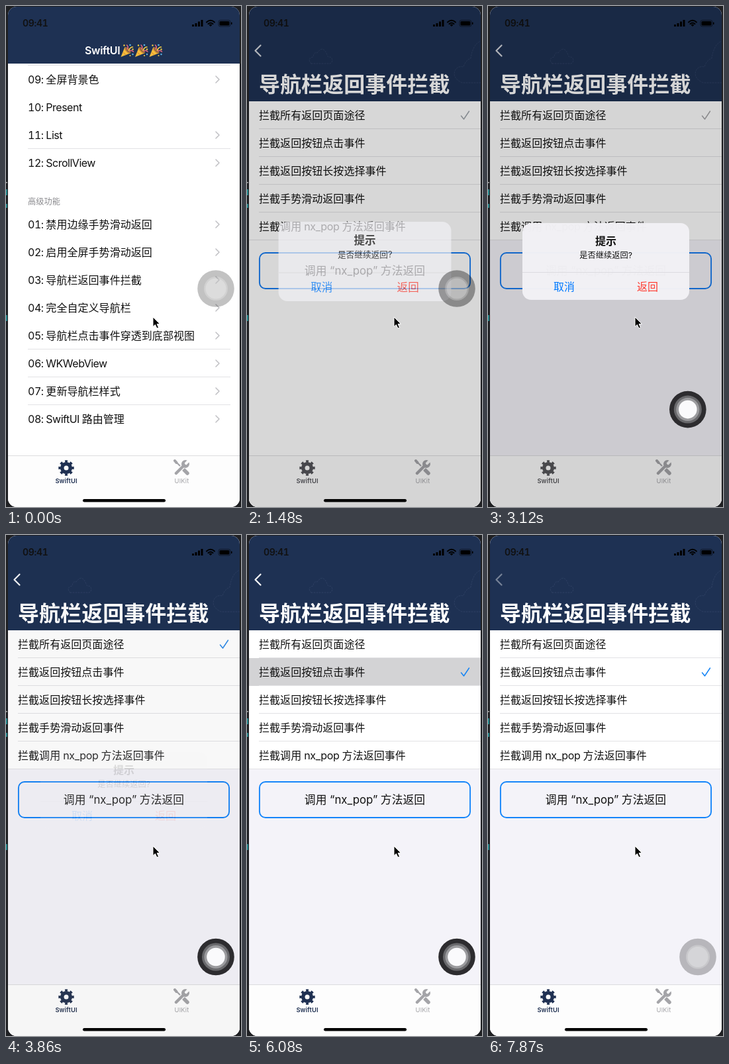
These frames come from a looping animation (355 px wide and 757 px high, 8000 ms). An HTML page:

```html
<!DOCTYPE html>
<html lang="zh-CN">
<head>
<meta charset="utf-8">
<style>
  html, body { margin: 0; width: 100%; height: 100%; overflow: hidden; background: #1f2023; }
  svg { display: block; width: 100%; height: 100%; }
  text {
    font: 16px Inter, "Noto Sans CJK SC", "Noto Sans CJK", sans-serif;
    font-feature-settings: "tnum"; letter-spacing: -.3px; fill: #111;
  }
  #menu text { letter-spacing: -.5px; }
  .cjk { letter-spacing: .05px; }
  .mid { text-anchor: middle; }
  .semi { font-weight: 600; }
  .line { fill: none; stroke-linecap: round; stroke-linejoin: round; }
</style>
</head>
<body>
<svg viewBox="0 0 355 757">
  <defs>
    <clipPath id="screen"><rect x="3" y="1" width="350" height="756" rx="13"/></clipPath>
    <g id="popper">
      <path d="M0 20 6 5 15 14Z" fill="#f7bd3c"/>
      <path d="M3.500 13 7.500 17M5.500 8.500 11.500 14.500" stroke="#e09a35" stroke-width="1.300"/>
      <ellipse cx="10.5" cy="9.5" rx="2.500" ry="5.800" transform="rotate(-45 10.5 9.5)" fill="#9b6a3c"/>
      <path class="line" d="M10 8Q12 5 9 2M13 11Q16 9 19 12" stroke="#e5667d" stroke-width="1.600"/>
      <path class="line" d="M12 10Q14 5 18 5" stroke="#f7cf46" stroke-width="1.600"/>
      <g fill="#58b7e8"><circle cx="14" cy="2" r="1.300"/><circle cx="18" cy="16" r="1.200"/></g>
      <g fill="#f7cf46"><circle cx="5" cy="2.500" r="1.200"/><circle cx="18" cy="8.500" r="1.200"/><circle cx="14" cy="18" r="1"/></g>
    </g>
  </defs>
  <g fill="#25878b">
    <rect y="266" width="2" height="1.5" fill="#aaa"/><rect y="277" width="2" height="9"/>
    <rect y="299" width="2" height="6"/><rect y="467" width="2" height="9"/>
  </g>
  <g clip-path="url(#screen)">
    <rect width="355" height="757" fill="#fff"/>
    <g id="menu"></g>
    <rect width="355" height="87" fill="#1e3153"/>
    <g id="menuTitle"></g>
    <g id="page"></g>
    <g id="pageTitle"></g>
    <path id="back" class="line" d="M20.500 59.500 12.500 67.500 20.500 75.500" stroke="#fff" stroke-width="2.200"/>
    <g id="status">
      <path d="M281 28h3v3h-3zM285.500 26h3v5h-3zM290 23.500h3v7.500h-3zM294.500 21h3v10h-3z"/>
      <path class="line" d="M303 24.500Q309 19 315 24.500M305.500 27Q309 24 312.500 27" stroke="#000" stroke-width="2" stroke-linecap="butt"/>
      <path d="M306.500 28.500Q309 26.500 311.500 28.500L309 31Z"/>
      <rect x="321" y="21.500" width="18" height="9.500" rx="2.800" fill="none" stroke="#000" stroke-opacity=".5"/>
      <rect x="322.500" y="23" width="15" height="6.500" rx="1.500"/><rect x="340" y="24.500" width="1.500" height="3.500" rx=".7"/>
    </g>
    <g id="tabs">
      <rect y="679" width="355" height="78" fill="#fdfdfd"/>
      <path d="M3 679.500H353" stroke="#dcdcde"/>
      <g id="gear" fill="none">
        <circle cx="91" cy="698" r="6.300" stroke-width="5.600"/>
        <circle cx="91" cy="698" r="10" stroke-width="3.400" pathLength="16" stroke-dasharray="1" stroke-dashoffset=".5"/>
      </g>
      <g class="line" stroke="#a4a4a8">
        <path d="M255.500 687.500 268 700" stroke-width="2.200"/><path d="M255 687 257.500 690" stroke-width="4"/>
        <path d="M269 701 274 706" stroke-width="5.500"/>
        <path d="M257 706 269 694" stroke="#fdfdfd" stroke-width="7"/>
        <path d="M257 706 270 693" stroke-width="4.500"/>
        <circle cx="271" cy="692" r="4" stroke-width="4"/>
        <path d="M272 691 278 685" stroke="#fdfdfd" stroke-width="4"/>
      </g>
    </g>
    <rect id="dim" width="355" height="757"/>
    <rect id="homeBar" x="116" y="745" width="125" height="4.500" rx="2.200"/>
    <g id="alert">
      <rect x="52" y="328" width="252" height="116" rx="13" fill="#f2f1f5" fill-opacity=".98"/>
      <path d="M52 402.500H304" stroke="#dcdbe0"/>
    </g>
    <g id="touch">
      <g id="idle">
        <circle r="27.800"/><circle r="18" fill="#fff" fill-opacity=".24"/><circle r="15.500" fill="#fff" fill-opacity=".24"/>
      </g>
      <g id="active">
        <circle r="27.800" fill="#2d2c2f"/><circle r="21" fill="#69696c"/><circle r="17.500" fill="#9b9b9e"/><circle r="13.800" fill="#fafafc"/>
      </g>
    </g>
  </g>
  <path d="M222 470v14.500l3.400-3 2.600 5.600 2.500-1.200-2.500-5.300h4.500Z" stroke="#fff" stroke-width="1"/>
</svg>
<script>
const $ = id => document.getElementById(id);
const add = (id, markup) => $(id).insertAdjacentHTML('beforeend', markup);
const set = (id, name, value) => $(id).setAttribute(name, value);
const label = (x, y, str, attrs = '') =>
  `<text x="${x}" y="${y}" ${attrs}>${str.replace(/[\u4e00-\u9fff]+/g, '<tspan class="cjk">$&</tspan>')}</text>`;
const rule = (x1, x2, y) => `<path d="M${x1} ${y}.5H${x2}" stroke="#e2e2e5"/>`;

// Menu screen
const basics = ['09: 全屏背景色', '10: Present', '11: List', '12: ScrollView'];
const advanced = ['01: 禁用边缘手势滑动返回', '02: 启用全屏手势滑动返回', '03: 导航栏返回事件拦截', '04: 完全自定义导航栏',
  '05: 导航栏点击事件穿透到底部视图', '06: WKWebView', '07: 更新导航栏样式', '08: SwiftUI 路由管理'];
const menuRow = (str, y) => label(33, y + 6, str) + (str.endsWith('Present') ? '' :
  `<path class="line" d="M317 ${y - 5}l5 5-5 5" stroke="#c2c2c6" stroke-width="1.6"/>`);
add('menu', '<rect id="pressed" x="3" y="393" width="355" height="42" fill="#d4d4d6"/>' +
  [89, 215, 518, 560, 602].map(y => rule(33, 339, y)).join('') +
  basics.map((s, i) => menuRow(s, 111 + 42 * i)).join('') +
  label(33, 300, '高级功能', 'style="font-size:12.2px;fill:#8a8a8e"') +
  advanced.map((s, i) => menuRow(s, 330 + 42 * i)).join(''));
add('menuTitle', label(119, 73, 'SwiftUI', 'class="semi" style="fill:#fff"') +
  [173.5, 195, 216.5].map(x => `<use href="#popper" x="${x}" y="57"/>`).join(''));

// Detail screen
const options = ['拦截所有返回页面途径', '拦截返回按钮点击事件', '拦截返回按钮长按选择事件', '拦截手势滑动返回事件', '拦截调用 nx_pop 方法返回事件'];
add('page', `<rect id="backdrop" x="3" width="350" height="757"/>
  <rect x="3" width="350" height="144" fill="#1e3153"/>
  <path id="clouds" class="line" stroke="#7d8db0" stroke-opacity=".2" stroke-width=".8" stroke-dasharray="2 2"
    d="M97 87H126Q132 82 126 77Q122 78 121 74Q115 58 106 71Q101 69 100 77Q90 79 97 87M353 116H325Q310 109 314 98Q318 90 327 92Q330 82 338 79Q341 58 353 53"/>
  <rect x="3" y="144" width="350" height="209" fill="#fff"/>
  <rect id="selected" x="3" y="186" width="350" height="42" fill="#d3d3d5"/>` +
  `<g id="topRules">${rule(18, 353, 185)}${rule(18, 353, 227)}</g>` +
  rule(18, 353, 269) + rule(18, 353, 311) + rule(3, 353, 353) +
  options.map((s, i) => label(18, 171 + 42 * i, s)).join('') +
  `<path id="check" class="line" d="M323.500 166l4 5 8-12" stroke-width="1.500"/>
  <rect id="button" x="18.900" y="373" width="318.200" height="54" rx="9" fill="none" stroke-width="1.900"/>` +
  label(178, 406, '调用 “nx_pop” 方法返回', 'class="mid" style="font-size:16.8px;letter-spacing:0"'));
add('pageTitle', label(18, 130, '导航栏返回事件拦截', 'class="semi" style="font-size:32px;fill:#fff"'));

add('status', label(25, 30.5, '09:41', 'class="semi" style="font-size:14px"'));
add('tabs', label(91, 721, 'SwiftUI', 'id="tabName" class="mid semi" style="font-size:9.4px;letter-spacing:.1px"') +
  label(265.5, 721, 'UIKit', 'class="mid" style="font-size:9.4px;letter-spacing:.1px;fill:#a4a4a8"'));
add('alert', label(178, 361, '提示', 'class="mid semi"') +
  label(178, 380.5, '是否继续返回?', 'class="mid" style="font-size:12.2px"') +
  label(115, 429.5, '取消', 'class="mid" style="fill:#007aff"') +
  label(241, 429.5, '返回', 'class="mid" style="fill:#ff3b30"'));

// Linear interpolation through [time, value] points
function track(t, ...points) {
  const i = points.findIndex(p => p[0] > t);
  if (i < 0) return points.at(-1)[1];
  if (i === 0) return points[0][1];
  const [[t0, v0], [t1, v1]] = [points[i - 1], points[i]];
  return v0 + (v1 - v0) * (t - t0) / (t1 - t0);
}
const mix = (a, b, k) => `rgb(${a.map((v, i) => Math.round(v + (b[i] - v) * k))})`;

const LOOP = 8000, STEP = 148.4;

function draw(now) {
  const t = Math.floor((now % LOOP + 6) / STEP) * STEP;

  // Push transition: critically damped spring
  const s = Math.max(0, t - 235) * .018;
  const rest = t > 1000 ? 0 : Math.exp(-s) * (1 + s);
  set('page', 'transform', `translate(${350 * rest})`);
  set('menu', 'transform', `translate(${-105 * (1 - rest)})`);
  set('menuTitle', 'transform', `translate(${-60 * (1 - rest)})`);
  set('menuTitle', 'opacity', Math.max(0, rest * 1.6 - .6));
  set('pageTitle', 'transform', `translate(${350 * rest * rest})`);
  set('pressed', 'opacity', t > 140 ? 1 : 0);

  const shown = track(t, [1340, 0], [1480, .7], [1640, 1], [3640, 1], [3860, .12], [4000, 0]);
  const dim = Math.min(1, shown * 1.35);
  const scale = track(t, [1340, 1.1], [1480, 1.036], [1640, 1]);
  set('dim', 'opacity', .165 * dim);
  set('alert', 'opacity', shown);
  set('alert', 'transform', `translate(178 386) scale(${scale}) translate(-178 -386)`);
  set('homeBar', 'opacity', track(t, [2520, 1], [2820, 0], [3270, 0], [3560, 1]));

  set('backdrop', 'fill', t > 1560 ? '#f4f3f9' : '#fff');
  set('clouds', 'opacity', t > 1300 ? 1 : 0);
  set('topRules', 'opacity', t > 1300 ? 1 : 0);
  set('selected', 'opacity', t < 5900 ? 0 : track(t, [6090, 1], [6400, 0]));
  set('check', 'transform', `translate(0 ${t > 5900 ? 42 : 0})`);
  set('check', 'stroke', mix([20, 132, 245], [165, 165, 168], dim));
  set('button', 'stroke', mix([20, 133, 250], [20, 122, 240], dim));
  const tint = mix([31, 48, 82], [86, 86, 90], dim);
  set('gear', 'stroke', tint);
  $('tabName').style.fill = tint;
  const backPressed = t > 7800 || (t > 1180 && t < 1340);
  set('back', 'opacity', (1 - rest) * (backPressed ? .4 : 1 - .2 * dim));

  const x = track(t, [2370, 317], [3110, 301.5], [3420, 317]);
  const y = track(t, [2370, 427], [2670, 485], [3110, 609], [3420, 637.5]);
  const active = track(t, [2220, 0], [2370, 1], [6400, 1], [6970, 0]);
  set('touch', 'transform', `translate(${x} ${y})`);
  set('active', 'opacity', active);
  set('idle', 'opacity', 1 - active);
  set('idle', 'fill-opacity', track(t, [150, .24], [600, .32], [1300, .3], [1480, .36], [2400, .36], [4000, .25]));

  requestAnimationFrame(draw);
}
requestAnimationFrame(draw);
</script>
</body>
</html>
```
